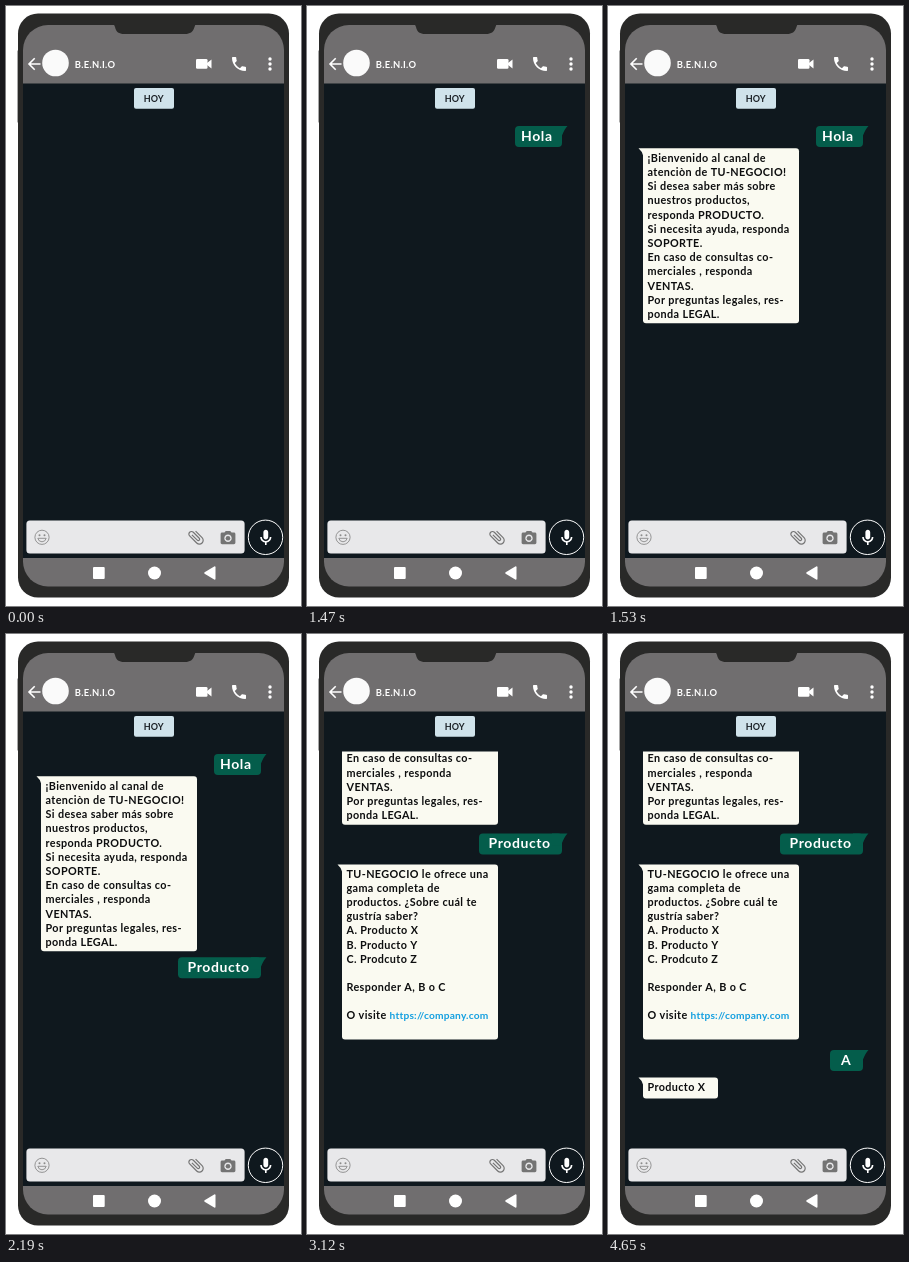
An HTML page with a canvas for the animation above (5400 ms loop, 295 px wide and 600 px high).

```html
<!DOCTYPE html>
<html lang="es">
<head>
<meta charset="utf-8">
<title>Chat</title>
<style>
html, body { margin: 0; width: 100%; height: 100%; overflow: hidden; background: #fff; }
canvas { display: block; width: 295px; height: 600px; }
</style>
</head>
<body>
<canvas id="stage"></canvas>
<script>
const W = 295, H = 600, LOOP = 5400;
const canvas = document.getElementById('stage');
const ctx = canvas.getContext('2d');
const ratio = window.devicePixelRatio || 1;
canvas.width = W * ratio;
canvas.height = H * ratio;

const BODY = '#292928', BAR = '#706e6f', CHAT = '#0f181e';
const GREEN = '#045d4b', PAPER = '#fafaf1', INK = '#0d0e0f', LINK = '#139fe0', GREY = '#747474';
const LINE = 14.2, LEFT = 39.5, SIZE = 10.8, SPACING = 0.38;

const ICONS = {
  call: 'M6.62 10.79c1.44 2.83 3.76 5.14 6.59 6.59l2.2-2.2c.27-.27.67-.36 1.02-.24 1.12.37 2.33.57 3.57.57.55 0 1 .45 1 1V20c0 .55-.45 1-1 1-9.39 0-17-7.61-17-17 0-.55.45-1 1-1h3.5c.55 0 1 .45 1 1 0 1.25.2 2.45.57 3.57.11.35.03.74-.25 1.02z',
  mic: 'M12 14c1.66 0 3-1.34 3-3V5c0-1.66-1.34-3-3-3S9 3.34 9 5v6c0 1.66 1.34 3 3 3zM17 11c0 2.76-2.24 5-5 5s-5-2.24-5-5H5c0 3.53 2.61 6.43 6 6.92V21h2v-3.08c3.39-.49 6-3.39 6-6.92z',
  clip: 'M16.5 6v11.5c0 2.21-1.79 4-4 4s-4-1.79-4-4V5c0-1.38 1.12-2.5 2.5-2.5s2.5 1.12 2.5 2.5v10.5c0 .55-.45 1-1 1s-1-.45-1-1V6H10v9.5c0 1.38 1.12 2.5 2.5 2.5s2.5-1.12 2.5-2.5V5c0-2.21-1.79-4-4-4S7 2.79 7 5v12.5c0 3.04 2.46 5.5 5.5 5.5s5.5-2.46 5.5-5.5V6z',
  camera: 'M9 2L7.17 4H4c-1.1 0-2 .9-2 2v12c0 1.1.9 2 2 2h16c1.1 0 2-.9 2-2V6c0-1.1-.9-2-2-2h-3.17L15 2zM12 17c-2.76 0-5-2.24-5-5s2.24-5 5-5 5 2.24 5 5-2.24 5-5 5z'
};

const WELCOME = [
  '¡Bienvenido al canal de', 'atenciòn de TU-NEGOCIO!', 'Si desea saber más sobre',
  'nuestros productos,', 'responda PRODUCTO.', 'Si necesita ayuda, responda',
  'SOPORTE.', 'En caso de consultas co-', 'merciales , responda',
  'VENTAS.', 'Por preguntas legales, res-', 'ponda LEGAL.'
];
const OFFER = [
  'TU-NEGOCIO le ofrece una', 'gama completa de', 'productos. ¿Sobre cuál te',
  'gustría saber?', 'A. Producto X', 'B. Producto Y', 'C. Prodcuto Z', '',
  'Responder A, B o C', ''
];

function box(x, y, w, h, r, color) {
  ctx.beginPath();
  ctx.roundRect(x, y, w, h, r);
  ctx.fillStyle = color;
  ctx.fill();
}

function disc(x, y, r, color) {
  ctx.beginPath();
  ctx.arc(x, y, r, 0, Math.PI * 2);
  ctx.fillStyle = color;
  ctx.fill();
}

function ring(x, y, r, color, width) {
  ctx.beginPath();
  ctx.arc(x, y, r, 0, Math.PI * 2);
  ctx.strokeStyle = color;
  ctx.lineWidth = width;
  ctx.stroke();
}

function shape(path, color) {
  ctx.fillStyle = color;
  ctx.fill(new Path2D(path), 'evenodd');
}

// Places a 24-unit icon by its centre.
function icon(name, x, y, scale, color, angle = 0) {
  ctx.save();
  ctx.translate(x, y);
  ctx.rotate(angle);
  ctx.scale(scale, scale);
  ctx.translate(-12, -12);
  shape(ICONS[name], color);
  ctx.restore();
}

// Draws a string and returns the x where it ends.
function text(str, x, y, size, color, spacing = 0) {
  ctx.font = `700 ${size}px Lato, sans-serif`;
  ctx.letterSpacing = spacing + 'px';
  ctx.fillStyle = color;
  ctx.fillText(str, x, y);
  return x + ctx.measureText(str).width;
}

function lines(list, y) {
  list.forEach((str, i) => text(str, LEFT, y + i * LINE, SIZE, INK, SPACING));
}

function sent(str, x, y, textX) {
  box(x, y, 255 - x, 21, 4, GREEN);
  shape(`M245 ${y}H260.5Q257.5 ${y + 3} 255 ${y + 9.5}V${y + 12}H245z`, GREEN);
  text(str, textX, y + 14.6, 14, '#fff', 0.6);
}

function received(y, w, h) {
  box(35, y, w, h, [0, 3, 3, 3], PAPER);
  shape(`M30.5 ${y}H35V${y + 7}Q34 ${y + 3} 30.5 ${y}z`, PAPER);
}

function phone() {
  box(11.6, 44, 3, 73, 1, BODY);
  box(12, 7.6, 271, 584, 20, BODY);
  ctx.save();
  ctx.beginPath();
  ctx.roundRect(17, 19, 261, 561.5, 25);
  ctx.clip();
  box(17, 19, 261, 562, 0, BAR);
  box(17, 77.5, 261, 474.5, 0, CHAT);
  ctx.restore();
  shape('M107 18H190Q189 19 188.5 21C187 26 184 28 179 28H118C113 28 110 26 109 21Q108.5 19 107 18z', BODY);
}

function header() {
  ctx.strokeStyle = '#fff';
  ctx.lineWidth = 1.6;
  ctx.stroke(new Path2D('M34.5 58H23.5M28.7 52.3L23 58L28.7 63.7'));
  disc(49.5, 57, 13.3, '#fafafa');
  text('B.E.N.I.O', 68.7, 61.7, 9.4, '#fff', 0.3);
  box(190, 53, 11.5, 9.8, 1.3, '#fff');
  shape('M201 57L205.5 53.5V62.5L201 59z', '#fff');
  icon('call', 233, 58, 0.78, '#fff');
  for (const y of [53, 58, 63]) disc(264, y, 1.7, '#fff');
  box(128, 82, 40, 20.8, 2, '#d0e3eb');
  text('HOY', 137.7, 95.8, 9, '#1b2126', 0.1);
}

function footer() {
  box(20.4, 514.4, 218.2, 33.2, 3.5, '#e8e8ea');
  ring(36, 531.3, 7.1, '#8b8b8b', 0.9);
  disc(33.5, 529.3, 1, '#8b8b8b');
  disc(38.5, 529.3, 1, '#8b8b8b');
  ctx.lineWidth = 0.9;
  ctx.stroke(new Path2D('M31.8 532.3H40.2Q39.3 535.8 36 535.8T31.8 532.3z'));
  icon('clip', 190, 531.5, 0.8, GREY, -Math.PI / 4);
  icon('camera', 222, 532.3, 0.74, GREY);
  disc(222, 532.3, 2.3, GREY);
  disc(259.5, 531.3, 17.2, CHAT);
  ring(259.5, 531.3, 17.2, '#fff', 1);
  icon('mic', 259.8, 531.8, 0.8, '#fff');
  box(87, 561, 11.7, 12, 1, '#fff');
  disc(148.5, 567, 6.5, '#fff');
  shape('M198.6 566.2L208.2 560.5Q209.5 560 209.5 561.3V572.7Q209.5 574 208.2 573.5L198.6 567.8Q197.6 567 198.6 566.2z', '#fff');
}

function firstPart(t) {
  if (t >= 750) sent('Hola', 208, 120, 214);
  if (t >= 1530) {
    received(142.3, 156, 175);
    lines(WELCOME, 155.8);
  }
  if (t >= 2160) sent('Producto', 172, 323.2, 181.5);
}

function secondPart(t) {
  box(35, 117.4, 156, 73.3, [0, 0, 3, 3], PAPER);
  lines(WELCOME.slice(7), 128.3);
  sent('Producto', 172, 199.6, 181.5);
  received(230.4, 156, 175);
  lines(OFFER, 243.6);
  const lastY = 243.6 + OFFER.length * LINE - 0.3;
  const linkX = text('O visite ', LEFT, lastY, SIZE, INK, SPACING);
  text('https://company.com', linkX, lastY, 10.2, LINK, 0.2);
  if (t >= 3960) sent('A', 222, 416, 233);
  if (t >= 4650) {
    received(443.4, 75, 21);
    lines(['Producto X'], 456.8);
  }
}

function draw(t) {
  ctx.setTransform(ratio, 0, 0, ratio, 0, 0);
  box(0, 0, W, H, 0, '#fff');
  phone();
  header();
  if (t < 3120) firstPart(t);
  else secondPart(t);
  footer();
}

const start = performance.now();
function tick() {
  draw((performance.now() - start) % LOOP);
  requestAnimationFrame(tick);
}
tick();
</script>
</body>
</html>
```
